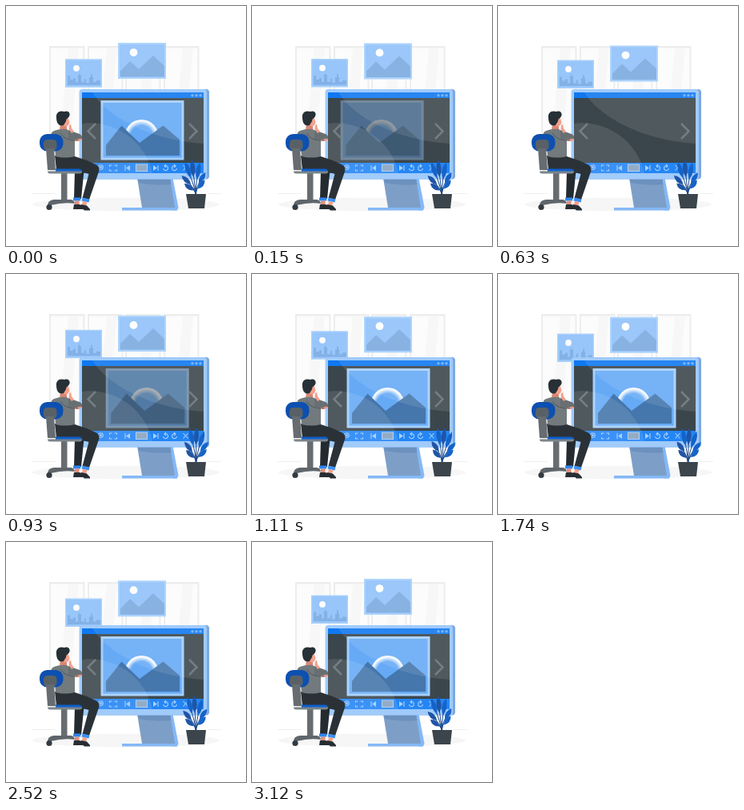
An HTML page for the animation above (3150 ms loop, 300 px wide and 300 px high).

```html
<!DOCTYPE html>
<html lang="en">
<head>
<meta charset="utf-8">
<style>
html, body { margin: 0; width: 100%; height: 100%; overflow: hidden; background: #fff; }
svg { display: block; width: 100vw; height: 100vh; }
</style>
</head>
<body>
<svg viewBox="0 0 300 300">
  <defs>
    <clipPath id="screen"><path d="M95 108H247V209H95Z"/></clipPath>
    <radialGradient id="glow">
      <stop offset=".65" stop-color="#fff" stop-opacity="0"/>
      <stop offset=".9" stop-color="#fff" stop-opacity=".9"/>
      <stop offset="1" stop-color="#fff"/>
    </radialGradient>
  </defs>

  <path d="M32 234.500H62M252 234.500H269" stroke="#f0f0f0"/>
  <ellipse cx="150" cy="248" rx="117" ry="8.500" fill="#f6f6f6"/>
  <g id="windows"></g>

  <g id="small">
    <path d="M74 66H120V101.500H74Z" fill="#a9d1fc"/>
    <path d="M75.500 67.500H118.500V100H75.500Z" fill="#98c5fa"/>
    <path d="M77 98.500V87H80V92H84V90H87V95H90V86H91V84H92V86H94V95H98V91H100V96H104V89H106V85H108V89H109V95H113V93H118V98.500Z" fill="#83b1e6"/>
    <circle cx="88" cy="77.500" r="3.900" fill="#fff"/>
  </g>
  <g id="large">
    <path d="M140 46H200V91H140Z" fill="#aed4fc"/>
    <path d="M142 48H198V89H142Z" fill="#9bc7fa"/>
    <path d="M143 81L155 69L166 79L184 62L198 75V88.500H143Z" fill="#88b2e2"/>
    <circle cx="159.500" cy="58" r="4.900" fill="#fff"/>
  </g>

  <!-- monitor -->
  <path d="M204 215H208.500L215.500 252L214 255.500H208Z" fill="#84b8f7"/>
  <path d="M145 252H212L213.500 255.500H145Z" fill="#84b8f7"/>
  <path d="M164 215H205L211 252H170Z" fill="#7d9fc7"/>
  <path d="M164 215H205L206.500 223Q185 225 166 221Z" fill="#6c91bf"/>
  <rect x="94" y="104" width="160" height="112.500" rx="4" fill="#7ca8df"/>
  <rect x="91.500" y="104" width="159.500" height="112.500" rx="4" fill="#a0cbfb"/>
  <path d="M95 108H247V209H95Z" fill="#3b464c"/>
  <path d="M95 108H247V115H95Z" fill="#0f78f0"/>
  <path d="M95 196H247V209H95Z" fill="#2486f5"/>
  <g fill="#69adf8"><circle cx="233" cy="111.800" r="1.700"/><circle cx="238" cy="111.800" r="1.700"/><circle cx="243" cy="111.800" r="1.700"/></g>

  <g id="photo">
    <path d="M118.500 118H222.500V192.500H118.500Z" fill="#a5cffb"/>
    <path d="M121.500 121H219.500V189.500H121.500Z" fill="#66aaf6"/>
    <circle cx="169.500" cy="163" r="21" fill="url(#glow)"/>
    <path d="M125 174L144.500 149.500L167 171L196.500 149.500L217 167V187H125Z" fill="#4576ac"/>
  </g>

  <g clip-path="url(#screen)" fill="#fff" opacity=".1">
    <path d="M108 108C126 138 180 168 247 172V108Z"/>
    <path d="M95 147A80 80 0 0 1 183 209H95Z"/>
  </g>
  <path d="M112 147L102.500 156.500L112 166M229 147L238.500 156.500L229 166" fill="none" stroke="#747e84" stroke-width="2.500"/>

  <g fill="none" stroke="#a9d0fd" stroke-width="1.100">
    <circle cx="118.500" cy="201.500" r="2.800"/><path d="M116.500 204L114 206.500M117 201.500H120M118.500 200V203"/>
    <path d="M129.500 201V199H132.500M135.500 199H138.500V201M138.500 204V206H135.500M132.500 206H129.500V204"/>
    <path d="M149 199V206M190 199V206"/>
    <path d="M155 199L150 202.500L155 206ZM184 199L189 202.500L184 206Z" fill="#a9d0fd" stroke="none"/>
    <path d="M162.500 198H176.500V206.500H162.500Z" fill="#94acc6"/>
    <path d="M198 200A3 3 0 1 1 196.500 203M200 198L198 200L200 202"/>
    <path d="M212 200A3 3 0 1 0 213.500 203M210 198L212 200L210 202"/>
    <path d="M221.500 199L227.500 205.500M227.500 199L221.500 205.500"/>
  </g>

  <!-- plant -->
  <g id="leaves"></g>
  <path d="M225 235H250L248 253H228Z" fill="#3b454b"/>

  <!-- chair -->
  <path d="M69 209H76.500V242H69Z" fill="#666c70"/>
  <path d="M52 249Q52 243 60 242H80Q85 242 86 247Q72 245 56 249Z" fill="#5f666b"/>
  <circle cx="54" cy="251.500" r="3.600" fill="#333b41"/>

  <!-- person -->
  <path d="M86 206H97.500L94 241H85Z" fill="#242b30"/>
  <path d="M84 239.500H93.500L93 243.500H84Z" fill="#2f86f0"/>
  <path d="M86 243.500H91.500V249H86Z" fill="#e58c78"/>
  <path d="M85 248H92L98 252V254H84Z" fill="#272e33"/>
  <path d="M61 187L86 188Q100 192 112 198Q118 201 116 207L104 242L95.500 240L103.500 210Q92 206 63 205Z" fill="#2b3237"/>
  <path d="M95.500 239.500L104.500 241.500L103.500 245.500L94.500 243.500Z" fill="#3c90f3"/>
  <path d="M96 243.800L101.500 245L100 250L95 249Z" fill="#f3a08c"/>
  <path d="M94 248L101 249.500L105 254V255.500H98L92 250Z" fill="#272e33"/>
  <path d="M68 147H76V155Q72 158 67 155Z" fill="#d98673"/>
  <path d="M70 139H77.500L79.500 145.500L78 149Q75 151.500 71 149Z" fill="#f3a08c"/>
  <path d="M63 140C62 133 67 130 73 132C78 130 81 134 79 138C77 141 75.500 140 75 144L72 149C66 151 63 146 63 140Z" fill="#263036"/>
  <path d="M60 156Q68 153 76 154L80 157L86 168V188Q74 191 62 188Q61 171 57 164Q55 158 60 156Z" fill="#737a7d"/>
  <path d="M78 155L92 160Q96 162 95 166L92 168L78 166Z" fill="#686f73"/>
  <path d="M79 149L81 148L82 153L85 157L82 159L78.500 154Z" fill="#f3a08c"/>
  <path d="M84 168L93 165.500L95.500 166.500L91 169Z" fill="#e9937f"/>
  <path d="M68 159Q74 169 90 168" fill="none" stroke="#52595d"/>

  <rect x="42" y="160" width="29.500" height="21.500" rx="9.500" fill="#0d50b0"/>
  <rect x="47" y="167" width="16.500" height="13.500" rx="4.500" fill="#596167"/>
  <path d="M50 178H60L62 205H52Z" fill="#666c70"/>
  <path d="M62 203.500H92Q95 204 95 207H62Z" fill="#0f5fcc"/>
  <path d="M52 206.500H95V208Q94 209.500 90 209.500H55Q52 209.500 52 206.500Z" fill="#7c858b"/>
</svg>
<script>
const LOOP = 3150;
const FADE = 250;
const SLIDE = 13;
const $ = id => document.getElementById(id);
const ease = k => k * k * (3 - 2 * k);
const ramp = (t, a, b) => Math.min(1, Math.max(0, (t - a) / (b - a)));

$('windows').innerHTML = [54, 102, 149, 197].map(x =>
  `<path d="M${x} 50h44.500v157h-44.500z" fill="#ededed"/>
   <path d="M${x + 2} 52.500h40.500v152h-40.500z" fill="#fcfcfc"/>
   <path d="M${x + 24} 52.500h13l-14 152h-13z" fill="#f7f7f7"/>`).join('');

// x, y, half length and tilt of each leaf
$('leaves').innerHTML = [
  [232, 204, 11, -11], [238, 203, 11, 3], [244.500, 207, 11, 18],
  [228, 216, 8, -38], [248, 216, 8, 40], [230, 225, 7, -45], [246, 224, 7, 45]
].map(([x, y, r, tilt], i) =>
  `<path d="M237.500 237Q237.500 228 ${x} ${y}" fill="none" stroke="#1c4a8c"/>
   <path d="M0 ${-r}Q6 0 0 ${r}Q-6 0 0 ${-r}" transform="translate(${x} ${y}) rotate(${tilt})" fill="${i % 2 ? '#1f55a6' : '#1663c8'}"/>`).join('');

const sway = [[0, -8], [630, -7], [1110, 3], [1740, 1], [2520, -4], [LOOP, -8]];
function swayAt(t) {
  const i = sway.findIndex(([end]) => end > t);
  const [a, from] = sway[i - 1], [b, to] = sway[i];
  return from + (to - from) * ease(ramp(t, a, b));
}

function bob(id, t, peak, height) {
  const y = height * (1 + Math.cos((t - peak) / LOOP * 2 * Math.PI)) / 2;
  $(id).setAttribute('transform', `translate(0 ${y})`);
}

// the photo leaves to the left and returns from the right
function slide(t) {
  const out = ramp(t, 0, FADE), back = ramp(t, 800, 800 + FADE);
  const x = back ? SLIDE * (1 - back) : -SLIDE * out;
  $('photo').setAttribute('transform', `translate(${x} 0)`);
  $('photo').setAttribute('opacity', 1 - out + back);
}

function draw() {
  const t = performance.now() % LOOP;
  bob('small', t, 1775, 8.5);
  bob('large', t, 1490, 8.3);
  slide(t);
  $('leaves').setAttribute('transform', `rotate(${swayAt(t)} 237.500 236)`);
  requestAnimationFrame(draw);
}
draw();
</script>
</body>
</html>
```
